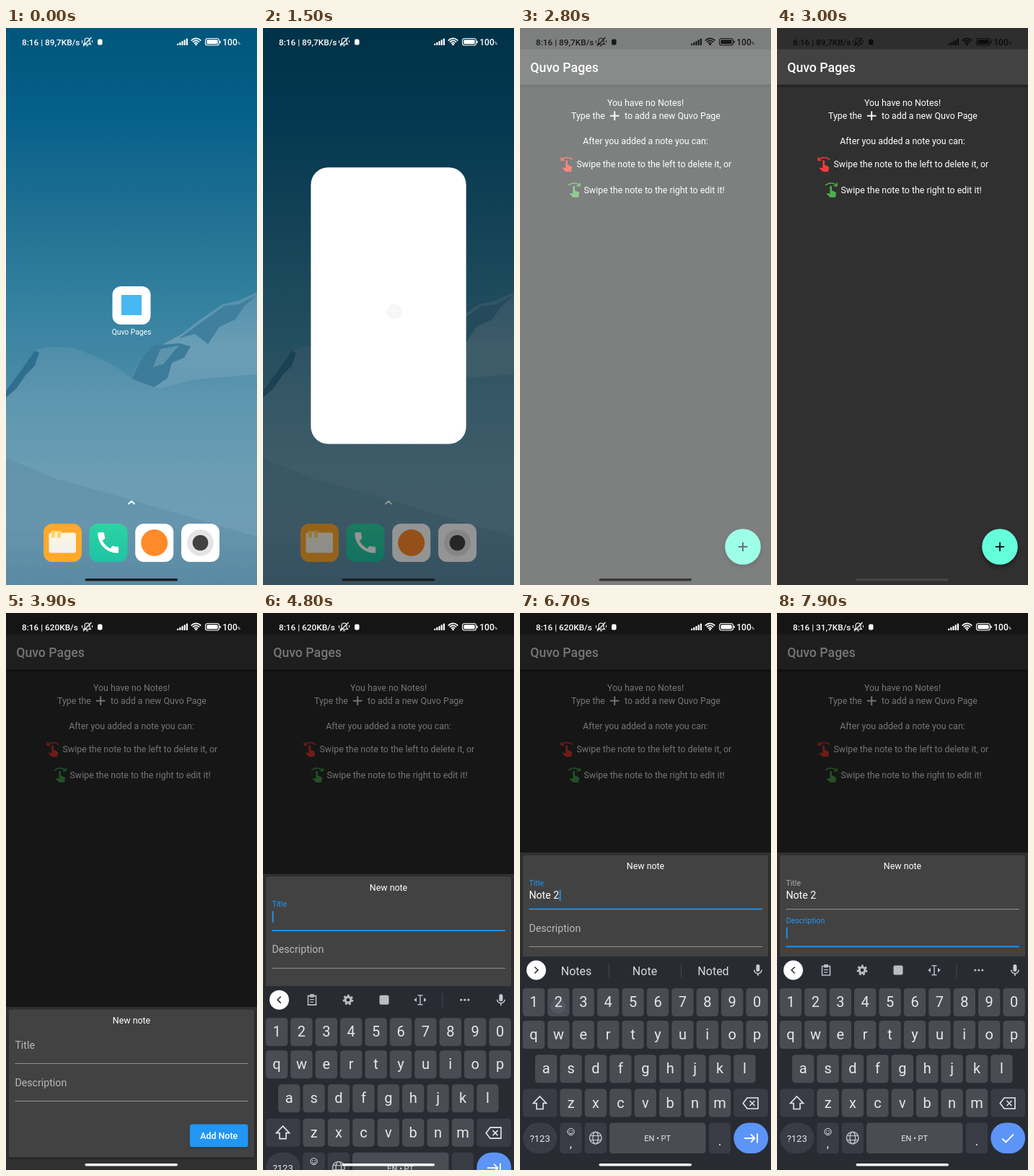
An HTML page with a canvas that plays this animation: 348x772 px, repeating every 8 s.

```html
<!DOCTYPE html>
<html lang="en">
<head>
<meta charset="utf-8">
<title>Quvo Pages</title>
<style>
html, body { margin: 0; width: 100%; height: 100%; overflow: hidden; background: #000; }
canvas { display: block; width: 348px; height: 772px; }
</style>
</head>
<body>
<canvas id="stage"></canvas>
<script>
const W = 348, H = 772, LOOP = 8000;
const canvas = document.getElementById('stage');
const c = canvas.getContext('2d');
const dpr = window.devicePixelRatio || 1;
canvas.width = W * dpr;
canvas.height = H * dpr;

const APP = 'Quvo Pages';
const BLUE = '#2196f3';
const HAND = new Path2D('M18.84 15.87l-4.54-2.26c-.17-.07-.35-.11-.54-.11H13v-6c0-.83-.67-1.5-1.5-1.5S10 6.67 10 7.5v10.74l-3.43-.72c-.08-.01-.15-.03-.24-.03-.31 0-.59.13-.79.33l-.79.8 4.94 4.94c.27.27.65.44 1.06.44h6.79c.75 0 1.33-.55 1.44-1.28l.75-5.27c.01-.07.02-.14.02-.2 0-.62-.38-1.16-.91-1.38z');
const PHONE = new Path2D('M20 15.4c-1.2 0-2.4-.2-3.5-.6-.4-.1-.8 0-1 .3l-1.6 1.9c-2.8-1.3-5.5-3.9-6.9-6.8l2-1.7c.2-.2.3-.6.2-1C8.800 6.400 8.600 5.200 8.600 4c0-.5-.4-1-1-1H4.200C3.600 3 3 3.200 3 4c0 9.300 7.700 17 17 17 .7 0 1-.6 1-1.200v-3.400c0-.6-.4-1-1-1z');

// helpers
const clamp = v => Math.max(0, Math.min(1, v));
const ramp = (t, a, b) => clamp((t - a) / (b - a));
const mix = (a, b, p) => a + (b - a) * p;
const out = (p, n = 3) => 1 - Math.pow(1 - p, n);
const gray = v => { v = Math.round(v); return `rgb(${v},${v},${v})`; };

function box(x, y, w, h, r, fill) {
  c.beginPath();
  c.roundRect(x, y, w, h, r);
  c.fillStyle = fill;
  c.fill();
}
function disc(x, y, r, fill) {
  c.beginPath();
  c.arc(x, y, r, 0, Math.PI * 2);
  c.fillStyle = fill;
  c.fill();
}
function ring(x, y, r, color, w) {
  c.beginPath();
  c.arc(x, y, r, 0, Math.PI * 2);
  c.strokeStyle = color;
  c.lineWidth = w;
  c.stroke();
}
function line(pts, color, w, close) {
  c.beginPath();
  for (let i = 0; i < pts.length; i += 2) c.lineTo(pts[i], pts[i + 1]);
  if (close) c.closePath();
  c.strokeStyle = color;
  c.lineWidth = w;
  c.stroke();
}
function poly(pts, fill) {
  c.beginPath();
  for (let i = 0; i < pts.length; i += 2) c.lineTo(pts[i], pts[i + 1]);
  c.fillStyle = fill;
  c.fill();
}
// y is the middle of the capitals
function text(s, x, y, size, color, align = 'left', weight = 400) {
  c.font = `${weight} ${size}px Roboto, "Noto Sans", sans-serif`;
  c.textAlign = align;
  c.fillStyle = color;
  c.fillText(s, x, y + size * 0.356);
}
function gradient(y0, y1, ...stops) {
  const g = c.createLinearGradient(0, y0, 0, y1);
  stops.forEach((s, i) => g.addColorStop(i / (stops.length - 1), s));
  return g;
}
function shadow(blur, dy, alpha, draw) {
  c.save();
  c.shadowColor = `rgba(0,0,0,${alpha})`;
  c.shadowBlur = blur * dpr;
  c.shadowOffsetY = dy * dpr;
  draw();
  c.restore();
}
function plus(x, y, r, color, w) {
  line([x - r, y, x + r, y], color, w);
  line([x, y - r, x, y + r], color, w);
}

// status bar and gesture bar
function statusBar(t) {
  let v = t < 1700 ? 255 : mix(255, 45, ramp(t, 1780, 1950));
  if (t > 2640) v = mix(45, 12, ramp(t, 2640, 2900));
  if (t > 3560) v = mix(12, 255, ramp(t, 3560, 3800));
  const k = gray(v);
  const speed = t < 3580 ? '89,7' : t < 7200 ? '620' : '31,7';
  text(`8:16 | ${speed}KB/s`, 22, 19.5, 11.8, k, 'left', 500);

  c.beginPath();
  c.moveTo(107.5, 22.5);
  c.lineTo(109, 21);
  c.lineTo(109, 18);
  c.arc(112.5, 17.5, 3.5, Math.PI, 0);
  c.lineTo(116, 21);
  c.lineTo(117.5, 22.5);
  c.closePath();
  c.strokeStyle = k;
  c.lineWidth = 1.1;
  c.stroke();
  line([107, 25, 118.5, 13], k, 1.2);
  line([111, 24.5, 114, 24.5], k, 1.2);
  line([105.5, 17, 105.5, 21], k, 1);
  line([119.5, 17, 119.5, 20], k, 1);
  box(127, 15.5, 6.5, 8, 2, k);

  for (let i = 0; i < 5; i++) {
    const h = 2.5 + i * 1.75;
    box(237 + i * 3.2, 24 - h, 2.2, h, 0.8, k);
  }
  c.lineCap = 'round';
  [8.6, 5.6, 2.7].forEach(r => {
    c.beginPath();
    c.arc(263.5, 23, r, -Math.PI * 0.76, -Math.PI * 0.24);
    c.strokeStyle = k;
    c.lineWidth = 1.7;
    c.stroke();
  });
  c.lineCap = 'butt';
  disc(263.5, 23, 1.3, k);
  c.beginPath();
  c.roundRect(276.5, 14.500, 19, 9.500, 3);
  c.lineWidth = 1.1;
  c.stroke();
  box(278.3, 16.3, 15.4, 5.9, 1.5, k);
  box(296.4, 17.5, 1.4, 3.600, 0.7, k);
  text('100', 300.3, 19.5, 12, k, 'left', 500);
  text('%', 320.8, 21.3, 6, k, 'left', 500);
}
function gestureBar(t) {
  let v = 30;
  if (t > 2640) v = mix(35, 68, ramp(t, 2640, 2900));
  if (t > 3560) v = mix(68, 255, ramp(t, 3560, 3800));
  box(109.5, 763, 128.5, 3.6, 1.8, gray(v));
}

// home screen
function wallpaper() {
  c.fillStyle = gradient(0, 500, '#00567b', '#06608a', '#1e6f92', '#33809f', '#4a8ca8');
  c.fillRect(0, 0, W, H);
  poly([172, 488, 190, 455, 215, 440, 244, 424, 272, 402, 300, 383, 322, 378, 348, 366, 348, 560, 172, 560],
    gradient(366, 520, '#538fab', '#6b9eb6', '#659ab2'));
  poly([348, 370, 322, 383, 303, 385, 272, 407, 240, 430, 262, 424, 280, 438, 296, 414, 318, 404, 330, 386], '#407f9e');
  poly([174, 486, 190, 455, 205, 440, 240, 437, 256, 441, 247, 457, 230, 464, 224, 485, 204, 499], '#3c7b9a');
  poly([204, 470, 214, 445, 240, 440, 228, 454, 218, 466], '#5c94ad');
  poly([0, 503, 22, 473, 40, 447, 56, 442, 92, 443, 124, 455, 150, 468, 176, 487, 212, 500, 262, 487, 348, 480, 348, 772, 0, 772],
    gradient(440, 772, '#4f8da9', '#5e97b0', '#6a9cb3', '#6f9eb4', '#608fa8'));
  poly([0, 503, 22, 473, 40, 447, 46, 450, 40, 468, 28, 480, 14, 500, 0, 512], '#2e6f91');
  poly([0, 596, 70, 625, 160, 650, 348, 705, 348, 772, 0, 772], 'rgba(70,120,148,.22)');
}
function tile(x, y, fill) {
  box(x, y, 53, 53, 12, fill);
}
function home(t) {
  wallpaper();
  tile(147.5, 358, '#fff');
  box(160, 370, 28, 28, 0, '#47b8f2');
  if (t > 1270) {
    c.globalAlpha = 0.2 * ramp(t, 1270, 1330);
    tile(147.5, 358, '#000');
    c.globalAlpha = 1;
  }
  text(APP, 174, 421, 10.3, '#fff', 'center');
  c.lineCap = 'round';
  line([170, 659.500, 174, 655.800, 178, 659.500], '#fff', 1.8);
  c.lineCap = 'butt';

  tile(52, 687, '#ffa92b');
  box(62, 697, 15, 12, 2, '#ffd877');
  box(59.5, 699.5, 37.5, 28, 3, gradient(699, 728, '#fff6e2', '#f1f1ee'));
  box(63, 697.5, 5, 9, 1, '#ffd36a');
  box(71, 697.5, 5, 9, 1, '#ffd36a');

  tile(115.5, 687, gradient(687, 740, '#2cd3a3', '#1fc3a4'));
  c.save();
  c.translate(122.5, 694.2);
  c.scale(1.6, 1.6);
  c.fillStyle = '#fff';
  c.fill(PHONE);
  c.restore();

  tile(179.2, 687, '#fff');
  disc(205.700, 713.500, 18.5, '#ff8a2a');

  tile(243, 687, '#fff');
  disc(269.5, 713.5, 18.3, '#e4e4e4');
  disc(269.5, 713.5, 10.8, '#424242');
}
function launch(t) {
  c.fillStyle = `rgba(0,0,0,${0.42 * ramp(t, 1330, 1480)})`;
  c.fillRect(0, 0, W, H);
  const p = ramp(t, 1350, 1996);
  if (p <= 0) return;
  const w = mix(53, W, out(p)), h = mix(53, H, out(p, 2.31));
  const cy = mix(384.5, 386, p);
  box(174 - w / 2, cy - h / 2, w, h, mix(13, 27, ramp(p, 0, 0.3)), '#fff');
  const fade = 1 - ramp(p, 0, 0.2);
  if (fade > 0) {
    c.globalAlpha = fade;
    const s = w * 0.53;
    box(174 - s / 2, cy - s / 2, s, s, 0, '#47b8f2');
    c.globalAlpha = 1;
  }
}

// app
function swipeIcon(x, y, color, dir) {
  c.save();
  c.translate(x, y);
  c.scale(0.886, 0.886);
  c.fillStyle = color;
  c.fill(HAND);
  c.translate(12, 0);
  c.scale(dir, 1);
  c.beginPath();
  c.moveTo(-8.500, 5);
  c.quadraticCurveTo(0, -1.500, 9, 5);
  c.strokeStyle = color;
  c.lineWidth = 1.7;
  c.stroke();
  line([-9, 1, -9, 5.800, -4, 5.800], color, 1.7);
  c.restore();
}
function notesPage(t) {
  c.fillStyle = '#303030';
  c.fillRect(0, 0, W, H);
  c.fillStyle = gradient(78, 84, 'rgba(0,0,0,.4)', 'rgba(0,0,0,0)');
  c.fillRect(0, 78, W, 6);
  c.fillStyle = '#424242';
  c.fillRect(0, 0, W, 78.500);
  c.fillStyle = '#2e2e2e';
  c.fillRect(0, 0, W, 29.500);
  text(APP, 14.2, 55, 17.7, '#fff', 'left', 500);

  const ink = '#fff', s = 12.4;
  text('You have no Notes!', 174, 104, s, ink, 'center');
  text('Type the', 71, 121.700, s, ink);
  plus(131.2, 121.700, 6.3, ink, 1.9);
  text('to add a new ' + APP.slice(0, -1), 145, 121.700, s, ink);
  text('After you added a note you can:', 174, 157, s, ink, 'center');
  swipeIcon(54.5, 178, '#f43c38', 1);
  text('Swipe the note to the left to delete it, or', 78.500, 189, s, ink);
  swipeIcon(64.5, 213.500, '#4caf50', -1);
  text('Swipe the note to the right to edit it!', 88.500, 224.300, s, ink);

  shadow(6, 3, 0.45, () => disc(309, 719, 24.8, '#64ffda'));
  const press = ramp(t, 3400, 3600);
  if (press > 0) disc(309, 719, 24.8 * out(press), 'rgba(255,255,255,.3)');
  plus(309, 719, 6.2, '#111', 1.9);
}
function field(label, y, value, focus, float) {
  const size = mix(14.2, 10.65, float);
  const color = focus ? BLUE : float > 0 ? '#a9adb3' : '#b9b9b9';
  text(label, 12.4, y - mix(26, 36.7, float), size, color);
  if (focus) {
    c.fillStyle = BLUE;
    c.fillRect(12.4, y - 1, 323.4, 1.8);
  } else {
    c.fillStyle = '#9b9b9b';
    c.fillRect(12.4, y - 0.4, 323.4, 0.9);
  }
  text(value, 12.4, y - 19.2, 14.2, '#fff');
  return 12.4 + (value ? c.measureText(value).width : 0);
}
const typed = [[5520, 'N'], [5640, 'No'], [5780, 'Not'], [5980, 'Note'], [6180, 'Note '], [6500, 'Note 2']];

function sheet(t) {
  const p = out(ramp(t, 3560, 3830));
  if (p <= 0) return;
  c.fillStyle = `rgba(0,0,0,${0.54 * p})`;
  c.fillRect(0, 0, W, H);

  const lift = 214 * out(ramp(t, 4560, 5060));
  c.save();
  c.translate(0, 226 * (1 - p) - lift);
  c.fillStyle = '#303030';
  c.fillRect(0, 546, W, 500);
  shadow(3, 1, 0.5, () => box(3.700, 549.5, 340.600, 205, 3.5, '#424242'));
  text('New note', 174, 565, 12.4, '#fff', 'center');

  const inTitle = t >= 4400 && t < 7430, inDesc = t >= 7430;
  let value = '', since = 4500;
  for (const [at, s] of typed) if (t >= at) { value = s; since = at; }
  if (inDesc) since = 7430;
  const titleEnd = field('Title', 624.5, value, inTitle, out(ramp(t, 4380, 4580)));
  const descEnd = field('Description', 676.5, '', inDesc, out(ramp(t, 7410, 7610)));
  const composing = value && t < 6180;
  if (composing) {
    c.fillStyle = '#fff';
    c.fillRect(12.4, 612, titleEnd - 12.4, 1);
  }
  const lit = Math.floor((t - since) / 500) % 2 === 0;
  if ((inTitle || inDesc) && lit) {
    c.fillStyle = BLUE;
    c.fillRect(inDesc ? descEnd + 0.4 : titleEnd + 0.4, (inDesc ? 676.5 : 624.5) - 27, 1.800, 15.5);
  }
  shadow(3, 1, 0.4, () => box(254.800, 708.5, 80.800, 31.700, 3.5, BLUE));
  text('Add Note', 295.2, 724.3, 12.4, '#fff', 'center', 500);
  c.restore();
}

// keyboard
const INK = '#e6e7eb', KEY = '#494c53', MOD = '#393c44', PITCH = 34.4;
function keyRow(chars, x, y, size, upper) {
  [...chars].forEach((ch, i) => {
    const kx = x + i * PITCH;
    box(kx - 15.2, y - 19.5, 30.4, 39, 4.5, KEY);
    text(upper ? ch.toUpperCase() : ch, kx, y - (size === 20 && !upper ? 0.5 : 0), size, INK, 'center');
  });
}
function mic() {
  const k = '#c9ccd2';
  box(327.4, 487, 5, 10, 2.5, k);
  c.beginPath();
  c.arc(329.9, 494.5, 5.2, 0, Math.PI);
  c.strokeStyle = k;
  c.lineWidth = 1.5;
  c.stroke();
  line([329.9, 499.5, 329.9, 503], k, 1.5);
}
function strip(t) {
  const k = '#b9bdc4', words = t >= 5520 && t < 7430;
  disc(22.5, 495, 13.5, '#fff');
  const d = words ? 1 : -1;
  line([22.5 - 2.2 * d, 490.5, 22.5 + 2.3 * d, 495, 22.5 - 2.2 * d, 499.5], '#333', 1.7);
  mic();
  if (words) {
    const list = t < 5640 ? ['N', 'No', 'Not'] : t < 5780 ? ['No', 'Not', 'Now']
      : t < 5980 ? ['Not', 'Note', 'Nothing'] : ['Notes', 'Note', 'Noted'];
    list.forEach((w, i) => text(w, 78 + i * 95, 496, 16, '#d7d9de', 'center'));
    line([123.5, 486, 123.5, 505], '#454850', 1);
    line([223.5, 486, 223.5, 505], '#454850', 1);
    return;
  }
  line([62.5, 489.5, 73.5, 489.5, 73.5, 502, 62.5, 502], k, 1.6, true);
  box(65, 487, 6, 4.5, 1, k);
  line([65, 494.500, 71, 494.500], k, 1.3);
  line([65, 498, 70, 498], k, 1.3);
  ring(118, 495, 4, k, 3.2);
  c.setLineDash([2.75, 2.75]);
  ring(118, 495, 6.2, k, 2.4);
  c.setLineDash([]);
  box(161.500, 488.500, 13, 13, 2, k);
  line([218, 489, 218, 501.5], k, 1.5);
  line([214.5, 488.8, 221.5, 488.8], k, 1.5);
  line([214.5, 501.600, 221.5, 501.600], k, 1.5);
  poly([213, 491.8, 213, 498.2, 209.3, 495], k);
  poly([223, 491.8, 223, 498.2, 226.7, 495], k);
  line([249, 486, 249, 505], '#454850', 1);
  [274.8, 279.8, 284.8].forEach(x => disc(x, 495, 1.6, k));
}
function keyboard(t) {
  const p = out(ramp(t, 4560, 5060));
  if (p <= 0) return;
  const upper = t >= 5320 && t < 5520;
  c.save();
  c.translate(0, 296 * (1 - p));
  c.fillStyle = '#282b32';
  c.fillRect(0, 476, W, 300);
  strip(t);
  keyRow('1234567890', 19, 539.5, 20);
  keyRow('qwertyuiop', 19, 584.5, 20, upper);
  keyRow('asdfghjkl', 36.2, 631.7, 20, upper);
  keyRow('zxcvbnm', 70.6, 679, 20, upper);

  box(4, 659.5, 47.5, 39, 4.5, MOD);
  const arrow = [27.5, 670, 36.5, 679.5, 32, 679.5, 32, 687.5, 23, 687.5, 23, 679.5, 18.500, 679.5];
  if (upper) poly(arrow, INK);
  line(arrow, INK, 1.6, true);
  box(296.5, 659.5, 47.5, 39, 4.5, MOD);
  line([315, 672, 330, 672, 330, 687, 315, 687, 309.3, 679.5], INK, 1.6, true);
  line([318.5, 676, 325.500, 683], INK, 1.5);
  line([325.500, 676, 318.5, 683], INK, 1.5);

  box(4, 706.5, 47.5, 42.5, 21, MOD);
  text('?123', 27.7, 728, 13, INK, 'center');
  box(55.3, 706.5, 30.4, 42.5, 4.5, MOD);
  ring(70.5, 719, 4.6, INK, 1);
  disc(68.8, 717.700, 0.8, INK);
  disc(72.2, 717.700, 0.8, INK);
  c.beginPath();
  c.arc(70.5, 719.3, 2.5, 0.2, Math.PI - 0.2);
  c.lineWidth = 1;
  c.stroke();
  text(',', 70.5, 735, 17, INK, 'center');
  box(89.7, 706.5, 30.4, 42.5, 4.5, MOD);
  text('.', 277, 732, 18, INK, 'center');

  const gk = '#bfc2c8';
  ring(104.8, 727.5, 8.3, gk, 1.4);
  c.beginPath();
  c.ellipse(104.8, 727.5, 3.800, 8.3, 0, 0, Math.PI * 2);
  c.stroke();
  line([97.3, 724.500, 112.3, 724.500], gk, 1.2);
  line([97.3, 730.500, 112.3, 730.500], gk, 1.2);

  box(124, 706.5, 133.5, 42.5, 4.5, t > 6100 && t < 6260 ? '#5a5d65' : KEY);
  text('EN • PT', 190.7, 728.5, 11, INK, 'center');
  box(261.700, 706.5, 30.4, 42.5, 4.5, MOD);
  text('.', 277, 732, 18, INK, 'center');
  box(296.3, 706.5, 47.8, 42.5, 21, '#5c94f7');
  if (t < 7430) {
    line([311, 728, 325, 728], '#fff', 1.9);
    line([320, 722.5, 325.5, 728, 320, 733.5], '#fff', 1.9);
    line([329, 721.5, 329, 734.5], '#fff', 1.9);
  } else {
    line([312.3, 728.5, 317.3, 733.300, 328, 722.5], '#fff', 1.9);
  }
  c.restore();
}

// finger marks: down, up, x, y
const taps = [
  [1270, 1400, 182, 393], [3390, 3500, 309, 722], [4270, 4380, 90, 600],
  [5270, 5360, 27, 680], [5470, 5550, 242, 684], [5610, 5720, 296, 600],
  [5750, 5840, 156, 590], [5940, 6020, 88, 590], [6140, 6220, 190, 730],
  [6440, 6540, 53, 545], [7380, 7460, 320, 727]
];
function touches(t) {
  for (const [down, up, x, y] of taps) {
    const a = ramp(t, down, down + 30) * (1 - ramp(t, up, up + 190));
    if (a <= 0) continue;
    disc(x, y, 10, `rgba(215,218,224,${0.45 * a})`);
    ring(x, y, 9.5, `rgba(190,215,225,${0.4 * a})`, 1);
    disc(x, y, 4.500, `rgba(255,255,255,${0.35 * a})`);
  }
}

function frame() {
  const t = performance.now() % LOOP;
  c.setTransform(dpr, 0, 0, dpr, 0, 0);
  c.globalAlpha = 1;
  if (t < 2000) {
    home(t);
    if (t > 1330) launch(t);
  } else {
    c.fillStyle = '#fdfefe';
    c.fillRect(0, 0, W, H);
    if (t > 2640) {
      notesPage(t);
      const veil = 1 - ramp(t, 2640, 2900);
      if (veil > 0) {
        c.fillStyle = `rgba(253,254,254,${veil})`;
        c.fillRect(0, 0, W, H);
      }
      sheet(t);
      keyboard(t);
    }
  }
  statusBar(t);
  gestureBar(t);
  touches(t);
  requestAnimationFrame(frame);
}
frame();
</script>
</body>
</html>
```
